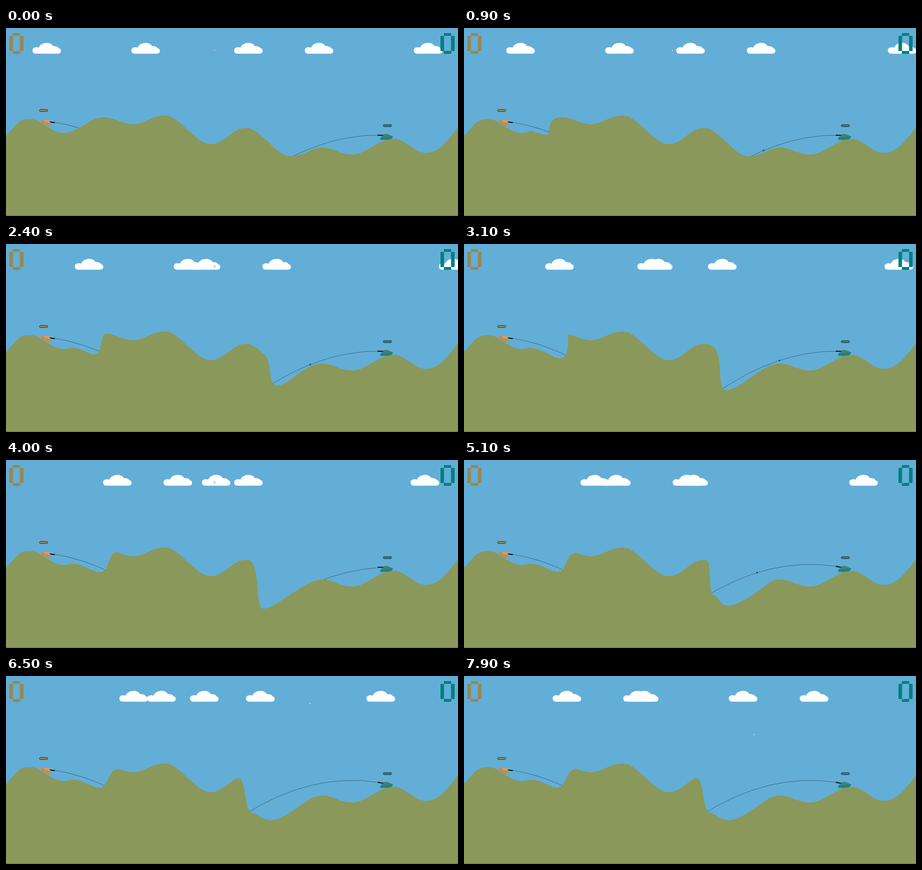
Animation of 800 by 335 pixels, one loop 8 s. Source, as an HTML page without scripts:

```html
<!DOCTYPE html>
<html lang="en">
<head>
<meta charset="utf-8">
<title>Hill tanks</title>
<style>
html, body { margin: 0; width: 100%; height: 100%; overflow: hidden; background: #63aed6; }
svg { display: block; width: 800px; height: 335px; }

/* flight parabolas; the ground is drawn over their far ends */
:root {
  --left: path("M86 168Q190 184.7 294 273.7");
  --flat: path("M658 191Q554 191 450 263");
  --low: path("M658 192Q604 195.2 550 218");
  --lob: path("M659 189.5Q539 171 419 248.7");
}

/* every part shares one 8 s loop */
.cloud, .cut, .ball, .mouse, #arcR, #gunR { animation: 8s linear infinite; }

.cloud { fill: #fff; animation-timing-function: steps(80); }
.east { animation-name: east; }
.west { animation-name: west; }
.turn { animation-name: turn; }
@keyframes east { to { transform: translateX(250px); } }
@keyframes west { to { transform: translateX(-250px); } }
@keyframes turn {
  0% { transform: none; animation-timing-function: steps(19); }
  23.75% { transform: translateX(60px); animation-timing-function: steps(61); }
  100% { transform: translateX(-130.6px); }
}

/* shells: one flight each, fired at --t */
.ball { fill: #14202a; opacity: 0; offset-path: var(--flat); offset-rotate: 0deg; animation-name: fly; animation-delay: var(--t); }
.ball.left { offset-path: var(--left); }
.ball.lob { offset-path: var(--lob); }
@keyframes fly {
  0% { offset-distance: 0%; opacity: 1; }
  9.375% { offset-distance: 100%; opacity: 1; }
  9.38%, 100% { offset-distance: 100%; opacity: 0; }
}

/* aim of the right tank: flat, low, then lobbed */
.arc { fill: none; stroke: #1d3a4c; stroke-opacity: .7; stroke-width: .75; }
#arcL { d: var(--left); }
#arcR { animation-name: arc; }
@keyframes arc {
  0%, 47.49% { d: var(--flat); }
  47.5%, 51.24% { d: var(--low); }
  51.25%, 100% { d: var(--lob); }
}
.gun { stroke: #0b0f12; stroke-width: 1.8; }
#gunR { transform-origin: 668px 191.3px; animation-name: aim; }
@keyframes aim {
  0%, 51.24% { transform: none; }
  51.25%, 100% { transform: rotate(9deg); }
}

/* craters: each hit digs at once, then the left wall slumps */
#cutL { animation-name: cutL; }
#cutR { animation-name: cutR; }
@keyframes cutL {
  0%, 8.24% { opacity: 0; }
  8.25%, 100% { opacity: 1; }
  0%, 8.25% { d: path("M104 140V187C122 176 142 198 150 188C150 178 153 160 170 158V140Z"); animation-timing-function: steps(2); }
  37.25%, 38.75% { d: path("M104 140V187C130 178 155 204 170 204C190 204 182 165 185 158V140Z"); animation-timing-function: cubic-bezier(0, .8, .2, 1); }
  98.75%, 100% { d: path("M104 140V187C130 178 150 199 165 199C182 199 180 166 198 166V140Z"); }
}
@keyframes cutR {
  0%, 12.59% { opacity: 0; }
  12.6%, 100% { opacity: 1; }
  0%, 12.6% { d: path("M470 140V208C485 218 478 243 495 243.5S520 224 540 217V140Z"); animation-timing-function: steps(2); }
  32.9%, 43.39% { d: path("M436 140V179.5C463 188 445 260 464 260.5S515 228 543 216V140Z"); }
  43.4%, 60.39% { d: path("M424 140V177.8C455 174 438 265 456 265S515 228 543 216V140Z"); }
  60.4%, 67.39% { d: path("M426 140V178C437 176 433 200 438 240C460 236 440 300 543 216V140Z"); }
  67.4%, 100% { d: path("M402 140V184.5C432 166 415 245 440 245C475 268 480 258 543 216V140Z"); }
}

.mouse { fill: #fff; stroke: #3d5866; stroke-width: .4; animation-name: mouse; }
@keyframes mouse {
  0%, 68.75% { transform: translate(368px, 37.5px); }
  78.75%, 82.5% { transform: translate(537.5px, 46.5px); }
  95%, 100% { transform: translate(512px, 102px); }
}
</style>
</head>
<body>
<svg viewBox="0 0 800 335">
  <defs>
    <path id="puff" d="M6 45.7A6 5.6 0 0 1 6 34.6Q9 33.8 12 35C16 24.3 33.5 24.3 37.5 32.3Q46 32 47 36A5 4.9 0 0 1 47 45.7Z"/>
    <path id="zero" d="M12 9h13v5H12zM6 14h6.3v27H6zM24.7 14H31v27h-6.3zM12 41h13v5H12z"/>
    <rect id="bar" width="14" height="3.4" rx="1" stroke="#1c2b2b"/>
    <mask id="dug" maskUnits="userSpaceOnUse" x="0" y="0" width="800" height="335">
      <rect width="800" height="335" fill="#fff"/>
      <path class="cut" id="cutL"/>
      <path class="cut" id="cutR"/>
    </mask>
  </defs>
  <rect width="800" height="335" fill="#63aed6"/>

  <g class="cloud east"><use href="#puff" x="46"/><use href="#puff" x="221"/></g>
  <g class="cloud west"><use href="#puff" x="403"/><use href="#puff" x="528"/></g>
  <g class="cloud turn"><use href="#puff" x="721"/></g>

  <path class="arc" id="arcL"/>
  <path class="arc" id="arcR"/>
  <circle class="ball left" r="1.2" style="--t:.45s"/>
  <circle class="ball left" r="1.2" style="--t:1.59s"/>
  <circle class="ball left" r="1.2" style="--t:2.65s"/>
  <circle class="ball" r="1.2" style="--t:.46s"/>
  <circle class="ball" r="1.2" style="--t:1.23s"/>
  <circle class="ball" r="1.2" style="--t:1.99s"/>
  <circle class="ball" r="1.2" style="--t:2.76s"/>
  <circle class="ball lob" r="1.2" style="--t:4.1s"/>
  <circle class="ball lob" r="1.2" style="--t:4.68s"/>

  <!-- hills: one handle per crest or dip, mirrored by S -->
  <g mask="url(#dug)">
    <path fill="#8a985b" d="M0 192C18 175 20 162 42 162S78 187 102 187S150 159 172 159S205 171.5 225 171.5S257 156 282 156S336 207 362 207S399 178 425 178S478 228.5 503 228.5S540 213 560 213S590 225.5 613 225.5S661 197.5 685 197.5S720 222.5 744 222.5S784 197 800 177V335H0Z"/>
  </g>
  <rect y="334" width="800" height="1" fill="#5f7d52"/>

  <path class="gun" d="M77 167.3L86.3 168.5"/>
  <path fill="#b98f5c" d="M61 163.5L76 163L78 168L79.5 174L73 174.5L63 169Z"/>
  <path fill="#c9a06a" d="M66 164L76 163L78 168.5L70 168.5Z"/>
  <use href="#bar" x="59.5" y="145.3" fill="#a8945a"/>

  <path class="gun" id="gunR" d="M658 191L669 191.4"/>
  <path fill="#25807c" d="M662 199.3L663.5 194L680 191L685.5 193.5L682 198L672 199.6Z"/>
  <path fill="#45806f" d="M666 194L668 190.5L671 188.7L676.5 189L680 192L677 194.5Z"/>
  <use href="#bar" x="668" y="172.3" fill="#1f9090"/>

  <use href="#zero" fill="#998751"/>
  <use href="#zero" x="763" fill="#047f82"/>
  <path class="mouse" d="M0 0V4.5L1.2 3.6L3 3.4Z"/>
</svg>
</body>
</html>
```
